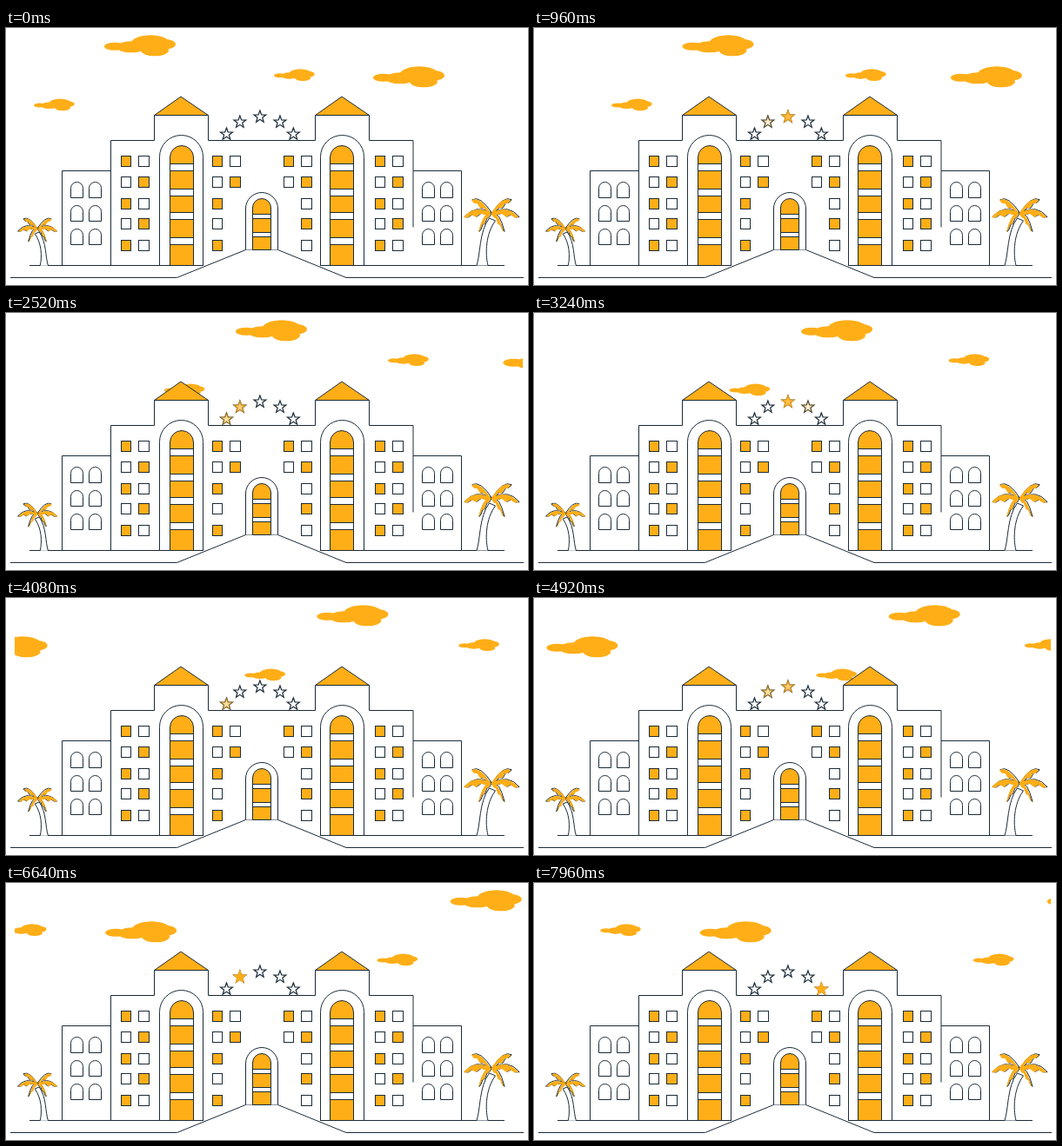
An HTML page with a canvas that plays this animation: 600 px wide and 296 px high, repeating every 8000 ms.

```html
<!DOCTYPE html>
<html lang="en">
<head>
<meta charset="utf-8">
<title>Hotel</title>
<style>
html, body { margin: 0; width: 100%; height: 100%; overflow: hidden; background: #fff; }
canvas { display: block; width: 600px; height: 296px; }
</style>
</head>
<body>
<canvas id="stage"></canvas>
<script>
const W = 600, H = 296, LOOP = 8000;
const INK = '#1b2b38', GOLD = '#ffae17', WHITE = '#fff';
const AXIS = 294, GROUND = 273.5;
const canvas = document.getElementById('stage');
const dpr = window.devicePixelRatio || 1;
canvas.width = W * dpr;
canvas.height = H * dpr;
const c = canvas.getContext('2d');
c.scale(dpr, dpr);

const clamp = v => Math.max(0, Math.min(1, v));

function line(...p) {
  c.beginPath();
  for (let i = 0; i < p.length; i += 2) c.lineTo(p[i], p[i + 1]);
  c.stroke();
}

function box(x, y, w, h, fill) {
  c.fillStyle = fill;
  c.fillRect(x, y, w, h);
  c.strokeRect(x, y, w, h);
}

function arch(x, top, w, bottom, fill, close) {
  const r = w / 2;
  c.beginPath();
  c.moveTo(x, bottom);
  c.arc(x + r, top + r, r, Math.PI, 0);
  c.lineTo(x + w, bottom);
  if (close) c.closePath();
  c.fillStyle = fill;
  c.fill();
  c.stroke();
}

// A cloud is a union of lobes, 82 by 24 at full size
function cloud(x, y, scale) {
  c.save();
  c.translate(x, y);
  c.scale(scale, scale);
  c.beginPath();
  const lobe = (cx, cy, rx, ry) => {
    c.moveTo(cx + rx, cy);
    c.ellipse(cx, cy, rx, ry, 0, 0, Math.PI * 2);
  };
  lobe(12, 13, 12, 4.5);
  lobe(31, 13.5, 17, 6.5);
  lobe(53, 9, 22, 9);
  lobe(69, 10.5, 13, 6);
  lobe(58, 17.5, 16, 6.5);
  c.fillStyle = GOLD;
  c.fill();
  c.restore();
}

function clouds(s) {
  const small = 0.57;
  c.save();
  c.beginPath();
  c.rect(10, 0, 584, H);
  c.clip();
  cloud(113 + 59.9 * s, 8.3, 1);
  cloud(422 + 59.3 * s, 44.3, 1);
  cloud(-271 + 58 * s, 44.3, 1);
  cloud(308 + 52 * s, 47.3, small);
  cloud(-384 + 57.8 * s, 47.3, small);
  cloud(32 + 59.4 * s, 81.6, small);
  c.restore();
}

// Five stars on an arc light up in turn, 400 ms each with a 200 ms crossfade
function stars(t) {
  const p = t % 2000;
  c.lineWidth = 1.2;
  for (let i = 0; i < 5; i++) {
    const k = i - 2;
    const tilt = 0.513 * Math.sign(k) * Math.abs(k) ** 0.9;
    const x = 291.9 + 47 * Math.sin(tilt), y = 149.3 - 47 * Math.cos(tilt);
    c.beginPath();
    for (let n = 0; n < 10; n++) {
      const r = n % 2 ? 3 : 7.3, a = n * Math.PI / 5 - Math.PI / 2;
      c.lineTo(x + r * Math.cos(a), y + r * Math.sin(a));
    }
    c.closePath();
    c.strokeStyle = INK;
    c.stroke();
    const fadeIn = clamp((p - i * 400) / 200);
    const fadeOut = i < 4 ? clamp((p - (i + 1) * 400) / 200) : 0;
    c.globalAlpha = fadeIn - fadeOut;
    c.fillStyle = c.strokeStyle = GOLD;
    c.fill();
    c.stroke();
    c.globalAlpha = 1;
  }
  c.strokeStyle = INK;
  c.lineWidth = 1;
}

// Lit windows alternate; below the second row an inner block keeps one column
function windows(x, only) {
  [147.5, 171.5, 196.5, 219.5, 244.5].forEach((y, row) => {
    for (let col = 0; col < 2; col++) {
      if (row > 1 && only !== undefined && col !== only) continue;
      box(x + col * 20, y, 11 + col, 12, row % 2 === col ? GOLD : WHITE);
    }
  });
}

function wingWindows(x) {
  for (let row = 0; row < 3; row++)
    for (let col = 0; col < 2; col++) {
      const y = 177.5 + row * 27;
      arch(x + col * 21, y, 14, y + 18, WHITE, true);
    }
}

// side is -1 for the left tower, 1 for the right one
function tower(side) {
  const at = (d, w) => AXIS + side * d - (side < 0 ? 0 : w);
  const x = at(123.5, 62);
  c.beginPath();
  c.moveTo(x, 100.5);
  c.lineTo(x + 30.5, 79);
  c.lineTo(x + 62, 100.5);
  c.closePath();
  c.fillStyle = GOLD;
  c.fill();
  c.stroke();
  line(x, 100.5, x, 129.5);
  line(x + 62, 100.5, x + 62, 129.5);
  arch(at(117.5, 50), 123.5, 50, GROUND, WHITE);
  const inner = at(105.5, 27);
  arch(inner, 135.5, 27, GROUND, GOLD);
  for (const y of [156.5, 185.5, 212.5, 241.5]) box(inner, y, 27, 8, WHITE);
}

function building() {
  line(64.5, GROUND, 64.5, 164.5, 120.5, 164.5);
  line(120.5, GROUND, 120.5, 129.5, 170.5, 129.5);
  line(232.5, 129.5, 355.5, 129.5);
  line(417.5, 129.5, 468, 129.5, 468, 229.5);
  line(468, 164.5, 523.5, 164.5, 523.5, GROUND);
  tower(-1);
  tower(1);
  line(27, GROUND, 227, GROUND);
  line(361, GROUND, 573, GROUND);
  line(5, 287.5, 196.5, 287.5, 275.5, 255.5, 312.5, 255.5, 391, 287.5, 595, 287.5);
  arch(275.5, 189.5, 37, 255.5, WHITE);
  arch(283.5, 196.5, 21, 255.5, GOLD, true);
  for (const y of [214.5, 235.5]) box(283.5, y, 21, 5, WHITE);
  wingWindows(74.5);
  wingWindows(478.5);
  windows(132.5);
  windows(237.5, 0);
  windows(319.5, 1);
  windows(424.5);
}

// A drooping leaf: smooth upper edge, notched lower edge
function leafPath(angle) {
  const tx = 32 * Math.cos(angle), ty = 23 * Math.sin(angle) + 1;
  const cx = tx * 0.6, top = ty * 0.5 - 13, bottom = ty * 0.5 + 1;
  c.beginPath();
  c.moveTo(0, 0);
  c.quadraticCurveTo(cx, top, tx, ty);
  for (let k = 1; k < 6; k++) {
    const u = 1 - k / 6, b = 2 * u * (1 - u);
    const cy = bottom + (k % 2 ? 3 : -4);
    c.lineTo(b * cx + u * u * tx, b * cy + u * u * ty);
  }
  c.closePath();
}

function palm(x, y, sx, sy) {
  c.save();
  c.translate(x, y);
  c.scale(sx, sy);
  c.lineWidth = 1 / sy;
  c.beginPath();
  c.moveTo(-17.5, 60.5);
  c.bezierCurveTo(-13, 48, -15, 22, -3, 6);
  c.lineTo(4, 9);
  c.bezierCurveTo(-7, 24, -8, 46, -4.5, 60.5);
  c.fillStyle = WHITE;
  c.fill();
  c.stroke();
  const leaves = Array.from({ length: 6 }, (_, i) => (i * 54 - 45) * Math.PI / 180);
  for (const a of leaves) {
    leafPath(a);
    c.stroke();
  }
  c.translate(-1, 0.5);
  c.fillStyle = GOLD;
  for (const a of leaves) {
    leafPath(a);
    c.fill();
  }
  c.restore();
}

function draw(t) {
  c.fillStyle = WHITE;
  c.fillRect(0, 0, W, H);
  c.strokeStyle = INK;
  c.lineWidth = 1;
  clouds(t / 1000);
  building();
  stars(t);
  palm(36, 230.7, -0.71, 0.71);
  palm(558.5, 213, 1, 1);
}

const start = performance.now();
function frame() {
  const t = (performance.now() - start) % LOOP;
  draw(Math.floor(t / 40) * 40);
  requestAnimationFrame(frame);
}
frame();
</script>
</body>
</html>
```
